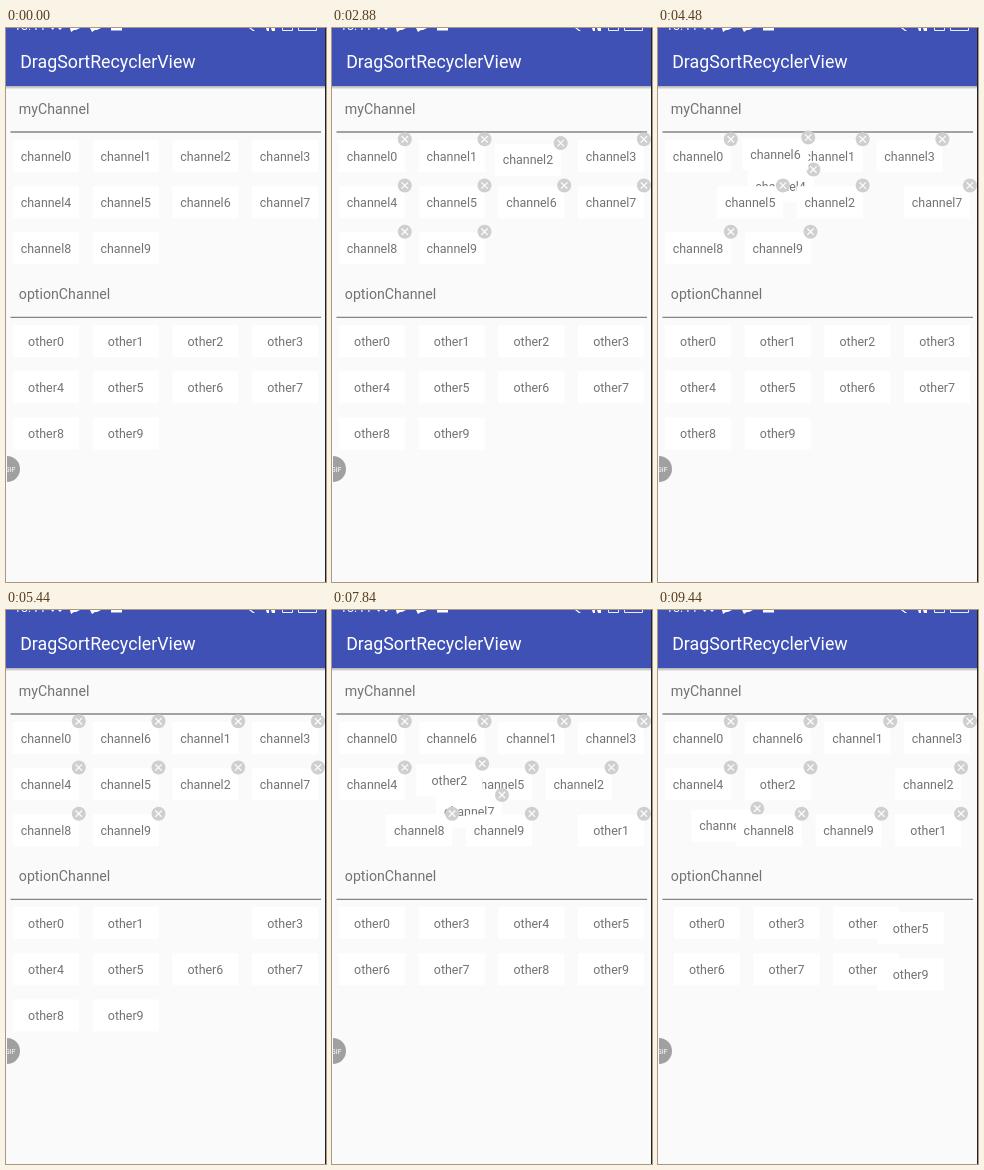
Recreate the animation shown at these times as an HTML page. Size 320 by 554 pixels, loop 9.6 s.

```html
<!DOCTYPE html>
<html lang="en">
<head>
<meta charset="utf-8">
<title>DragSortRecyclerView</title>
<style>
  html, body { margin: 0; width: 100%; height: 100%; overflow: hidden; background: #fafafa; }
  svg { display: block; width: 100vw; height: 100vh; font-family: Roboto, sans-serif; }
  .head { font-size: 14.2px; fill: #737373; }
  .cell text { font-size: 12.44px; fill: #737373; text-anchor: middle; }
  .cell rect { fill: #fff; }
  .cell.pressed rect { fill: #f0f0f0; }
</style>
</head>
<body>
<svg id="stage" viewBox="0 0 320 554">
  <defs>
    <linearGradient id="shade" x2="0" y2="1">
      <stop stop-color="#000" stop-opacity=".3"/>
      <stop offset="1" stop-color="#000" stop-opacity="0"/>
    </linearGradient>
  </defs>
  <rect width="320" height="554" fill="#fafafa"/>
  <rect y="58" width="320" height="3.5" fill="url(#shade)"/>
  <rect width="320" height="58" fill="#3f51b5"/>
  <g fill="#fff">
    <text x="8" y="2.4" font-size="12.4">18:44</text>
    <path d="M45 0h3l-1 2zM52 0h4l-2 2zM64 0h10l-4 2h-2l-3 2zM84 0h11l-4 2h-2l-3 2zM105 0h11v2.5h-11zM243 0h2l4 3h-2zM260 0h3v3h-2zM265 0h4v3h-3z"/>
    <path d="M276.5 0v2.5h10V0M292.5 0v2.5h18V0" fill="none" stroke="#fff" stroke-width=".9"/>
    <text x="14.2" y="40.2" font-size="17.8">DragSortRecyclerView</text>
  </g>
  <text class="head" x="12.8" y="86.3">myChannel</text>
  <text class="head" x="12.8" y="271.3">optionChannel</text>
  <path d="M4.5 104H315M4.5 289.4H315" stroke="#858585" stroke-width="1.4"/>
  <g id="cells"></g>
  <path d="M1 428a13 13 0 0 1 0 26z" fill="#a0a0a0"/>
  <text x="-1" y="443.6" font-size="7" fill="#fff">GIF</text>
  <path d="M319.5 0V554" stroke="#222"/>
</svg>
<script>
const LOOP = 9600, STEP = 160, MOVE = 250, FADE = 120;
const NS = 'http://www.w3.org/2000/svg';
const layer = document.getElementById('cells');

const add = (parent, tag, attrs, text) => {
  const el = parent.appendChild(document.createElementNS(NS, tag));
  for (const k in attrs) el.setAttribute(k, attrs[k]);
  if (text) el.textContent = text;
  return el;
};

// Drags carry a path of [time, dx, dy] from the starting slot; taps carry a hide time.
const actions = [
  { id: 'channel2', at: 3280, to: 5, path: [[2880, -3.5, 3.8], [3040, -32, 27], [3200, -66, 56], [3360, -83, 65], [3520, -81, 51], [3680, -79.7, 46.2]] },
  { id: 'channel6', at: 4330, to: 1, path: [[4160, -8, -6], [4320, -58, -36], [4480, -82, -48], [4640, -79.7, -46.2]] },
  { id: 'other2', at: 5480, to: 10, list: 'my', hide: 5440 },
  { id: 'other1', at: 6440, to: 11, list: 'my', hide: 6400 },
  { id: 'other2', at: 7700, to: 5, path: [[7360, -3, -4], [7520, -25, -16], [7680, -60, -36], [7840, -82, -50], [8000, -80, -47], [8160, -79.7, -46.2]] },
  { id: 'channel5', at: 9386, to: 0, list: 'opt', hide: 9280 }
];

const names = base => Array.from({ length: 10 }, (_, i) => base + i);
const layouts = [{ at: -LOOP, my: names('channel'), opt: names('other') }];
for (const { id, at, to, list = 'my' } of actions) {
  const last = layouts[layouts.length - 1];
  const next = { at, my: last.my.filter(n => n !== id), opt: last.opt.filter(n => n !== id) };
  next[list].splice(to, 0, id);
  layouts.push(next);
}

const cells = {};
for (const id of [...layouts[0].my, ...layouts[0].opt]) {
  const g = add(layer, 'g', { class: 'cell' });
  add(g, 'rect', { width: 66, height: 32 });
  add(g, 'text', { x: 33, y: 20.6 }, id);
  const badge = add(g, 'g', { transform: 'translate(65.8 -.7)' });
  add(badge, 'circle', { r: 7, fill: '#cfcfcf' });
  add(badge, 'path', { d: 'M-3.2-3.2 3.2 3.2M3.2-3.2-3.2 3.2', stroke: '#fff', 'stroke-width': 1.2 });
  cells[id] = { g, badge };
}

const mix = (a, b, k) => a + (b - a) * k;
const clamp = k => Math.max(0, Math.min(1, k));
const ease = k => (1 - Math.cos(Math.PI * clamp(k))) / 2;

function slot(layout, id) {
  const mine = layout.my.includes(id);
  const i = (mine ? layout.my : layout.opt).indexOf(id);
  return { mine, x: 7 + 79.7 * (i % 4), y: (mine ? 112 : 297) + 46.2 * Math.floor(i / 4) };
}

function along(path, t) {
  const i = path.findIndex(p => p[0] >= t);
  if (i === 0) return path[0].slice(1);
  const a = path[i - 1], b = path[i], k = (t - a[0]) / (b[0] - a[0]);
  return [mix(a[1], b[1], k), mix(a[2], b[2], k)];
}

let order = '';
function draw(t) {
  const n = layouts.findLastIndex(l => l.at <= t);
  const now = layouts[n], before = layouts[Math.max(0, n - 1)];
  const drag = actions.find(a => a.path && t >= a.path[0][0] && t <= a.path[a.path.length - 1][0]);
  const k = ease((t - now.at) / MOVE);
  const ids = [...now.my, ...now.opt];

  for (const id of ids) {
    const { g, badge } = cells[id];
    const a = slot(before, id), b = slot(now, id);
    let x = mix(a.x, b.x, k), y = mix(a.y, b.y, k), alpha = 1;
    if (drag && drag.id === id) {
      const start = slot(layouts[actions.indexOf(drag)], id);
      const [dx, dy] = along(drag.path, t);
      x = start.x + dx;
      y = start.y + dy;
    }
    const tap = actions.find(o => o.id === id && o.hide <= t);
    if (tap) {
      alpha = clamp((t - tap.at - MOVE) / FADE);
      if (tap.at === now.at) ({ x, y } = b);
    }
    g.setAttribute('transform', `translate(${x.toFixed(2)} ${y.toFixed(2)})`);
    g.setAttribute('opacity', alpha);
    g.classList.toggle('pressed', id === 'channel2' && t >= 1600 && t < 1920);
    badge.setAttribute('display', b.mine && t >= 1920 ? 'inline' : 'none');
  }

  if (drag) ids.push(ids.splice(ids.indexOf(drag.id), 1)[0]);
  if (ids.join() !== order) {
    order = ids.join();
    layer.append(...ids.map(id => cells[id].g));
  }
}

function tick() {
  const t = performance.now() % LOOP;
  draw(Math.floor(t / STEP) * STEP);
  requestAnimationFrame(tick);
}
tick();
</script>
</body>
</html>
```
